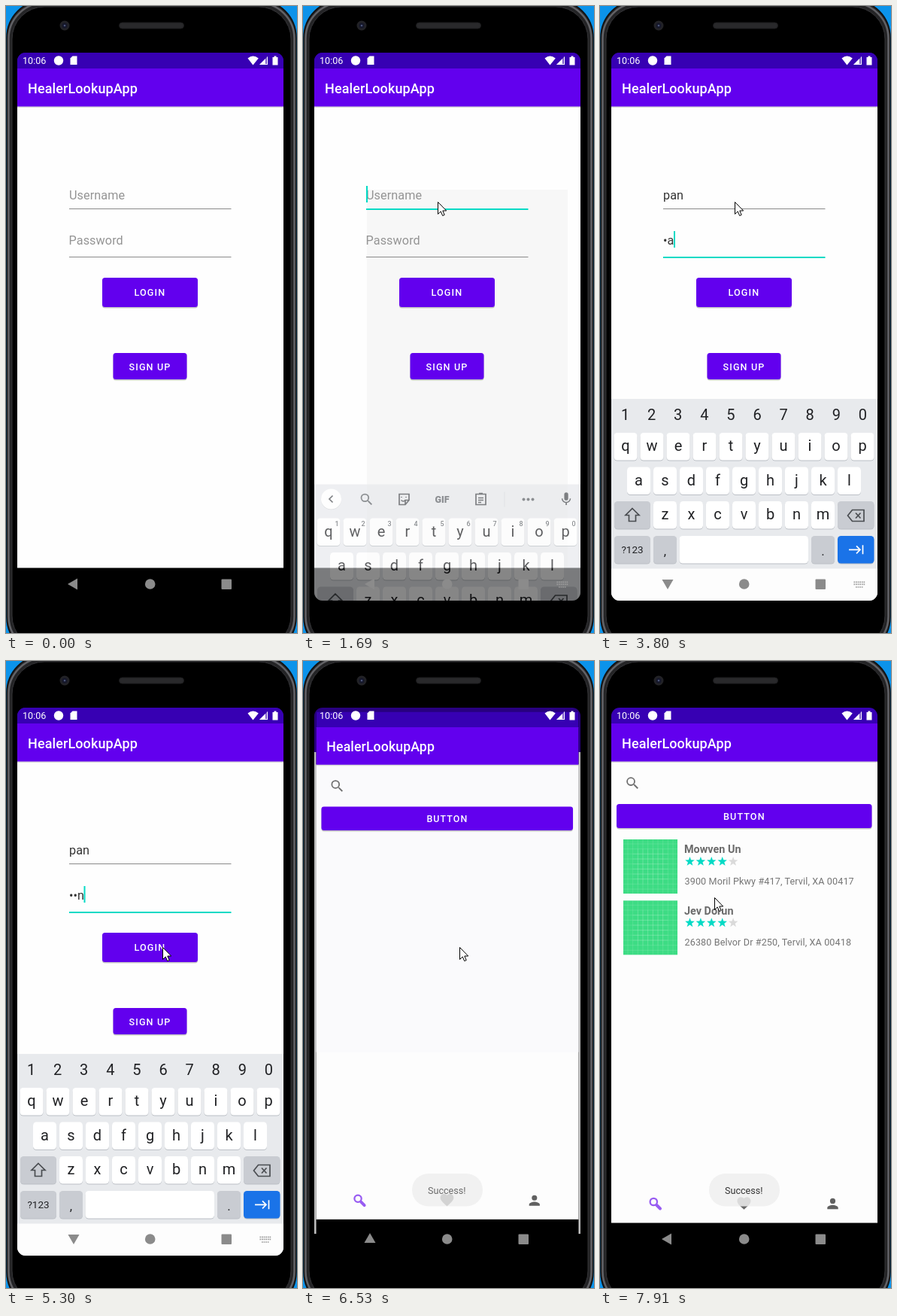
Animation, 387 px wide and 833 px high, one loop 8000 ms. Source, as an HTML page:

```html
<!DOCTYPE html>
<html lang="en">
<head>
<meta charset="utf-8">
<title>Login demo</title>
<style>
  html, body { margin: 0; width: 100%; height: 100%; overflow: hidden; background: #0c93ea; }
  svg { display: block; width: 387px; height: 833px; font: 16.2px Roboto, sans-serif; }
  .field { letter-spacing: .1px; fill: #333; }
  .hint { fill: #949494; }
  .btn { font-size: 12.6px; font-weight: 500; letter-spacing: 1.12px; fill: #fff; }
  .small { font-size: 12.6px; }
  .key { font-size: 20px; fill: #202124; text-anchor: middle; }
  .tip { font-size: 9px; font-weight: 500; fill: #5f6368; text-anchor: middle; }
  .word { font-size: 16.5px; fill: #3c4043; text-anchor: middle; }
  .line { fill: none; stroke: #4a4d51; stroke-width: 1.7; }
  .name { font-size: 14.4px; font-weight: 700; fill: #6b6b6b; }
  .addr { font-size: 12.6px; letter-spacing: .12px; fill: #757575; }
</style>
</head>
<body>
<svg viewBox="0 0 387 833">
  <defs>
    <clipPath id="screen"><rect x="15" y="62" width="354" height="728" rx="11"/></clipPath>
    <path id="search" d="M15.5 14h-.79l-.28-.27A6.47 6.47 0 0 0 16 9.5 6.5 6.5 0 1 0 9.5 16c1.61 0 3.09-.59 4.23-1.57l.27.28v.79l5 4.99L20.49 19zm-6 0A4.5 4.5 0 1 1 14 9.5 4.5 4.5 0 0 1 9.5 14z"/>
    <path id="mic" d="M12 14a3 3 0 0 0 3-3V5a3 3 0 0 0-6 0v6a3 3 0 0 0 3 3zm5.3-3c0 3-2.54 5.1-5.3 5.1S6.7 14 6.7 11H5c0 3.41 2.72 6.23 6 6.72V21h2v-3.28c3.28-.48 6-3.3 6-6.72z"/>
    <g id="bar">
      <rect x="15" y="133" width="354" height="2" opacity=".14"/>
      <rect x="15" y="62" width="354" height="22" fill="#3700b3"/>
      <rect x="15" y="83" width="354" height="50.500" fill="#6200ee"/>
      <text x="29" y="116" font-size="18" font-weight="500" letter-spacing=".1" fill="#fff">HealerLookupApp</text>
    </g>
  </defs>

  <!-- phone body -->
  <rect x="1" y="-8" width="385" height="870" rx="50" fill="#242426" stroke="#111" stroke-width="1.500"/>
  <rect x="3.500" y="-4" width="380" height="862" rx="47" fill="none" stroke="#626266" stroke-width="2.500"/>
  <rect x="8" y="1" width="371" height="852" rx="43" stroke="#343437"/>
  <rect x="150.500" y="22" width="86" height="8" rx="4" fill="#29292b" stroke="#1b1b1c"/>
  <circle cx="78" cy="26" r="6.500" fill="#222226"/>
  <circle cx="78" cy="26" r="3.500" fill="#15172a"/>
  <circle cx="78" cy="26" r="1.300" fill="#4b5478"/>

  <g clip-path="url(#screen)">
    <g data-t="0 6530">
      <rect x="15" y="133" width="354" height="613.500" fill="#fefefe"/>
      <rect data-t="1440 1810" x="85" y="244" width="267" height="502" fill="#f7f7f7"/>
      <rect data-t="6410 6530" x="15" y="133" width="354" height="613.500" fill="#fafafc"/>
      <use href="#bar"/>
      <text id="userHint" class="field hint" x="84" y="256.500">Username</text>
      <text id="passHint" class="field hint" x="83.500" y="317">Password</text>
      <text id="user" class="field" x="84" y="256.500"></text>
      <text id="pass" class="field" x="84" y="317"></text>
      <rect id="typed" x="84" y="257.500" height="1" fill="#444"/>
      <path id="userLine" d="M84 269.500H299.500"/>
      <path id="passLine" d="M84 333.500H299.500"/>
      <rect id="caret" width="2" height="22" fill="#03dac5"/>

      <rect data-t="5610 5880" x="127" y="363" width="129" height="41" rx="4" opacity=".2"/>
      <rect x="128" y="362" width="127" height="39.500" rx="3.500" opacity=".22"/>
      <rect x="128" y="361" width="127" height="39" rx="3.500" fill="#6200ee"/>
      <rect data-t="5610 5730" x="128" y="361" width="127" height="39" rx="3.500" fill="#fff" opacity=".1"/>
      <rect data-t="5730 5880" x="128" y="361" width="127" height="39" rx="3.500" fill="#fff" opacity=".2"/>
      <text class="btn" x="170.500" y="385.300">LOGIN</text>
      <rect x="142.500" y="462" width="98" height="35.500" rx="3.500" opacity=".22"/>
      <rect x="142.500" y="461" width="98" height="35" rx="3.500" fill="#6200ee"/>
      <text class="btn" x="163.500" y="483.500">SIGN UP</text>

      <g id="kb">
        <rect x="15" y="522" width="354" height="268" fill="#e8eaed"/>
        <rect x="15" y="747.500" width="354" height="43" fill="#fdfdfd"/>
        <g id="keys"></g>

        <path class="line" d="M43 667.500l9 9h-4.500v8h-9v-8H34z"/>
        <path class="line" d="M335.500 669.500H351v15H335.500l-6-7.500zM340 673.500l6.500 7m0-7l-6.500 7"/>
        <path class="line" d="M331 722.300h15m-5-5l5 5-5 5m8.500-11v12" style="stroke:#fff"/>
        <text class="key" x="43" y="727" style="font-size:13.500px">?123</text>
        <text class="key" x="86.500" y="730" style="font-size:17px">,</text>
        <text class="key" x="296.500" y="730" style="font-size:17px">.</text>

        <g data-t="0 3280">
          <circle cx="37.500" cy="542.300" r="13.500" opacity=".1"/>
          <circle cx="37.500" cy="541.500" r="13.500" fill="#fff"/>
          <use href="#mic" transform="translate(339.500 531) scale(.88)" fill="#4a4d51"/>
          <g class="line"><circle cx="121.500" cy="722" r="8.500"/><path d="M117 724q4.500 5 9 0"/></g>
          <g fill="#4a4d51"><circle cx="118.500" cy="719.500" r="1.400"/><circle cx="124.500" cy="719.500" r="1.400"/></g>
        </g>
        <g data-t="0 2080">
          <path class="line" d="M39.500 537l-4.500 4.500 4.500 4.500"/>
          <use href="#search" transform="translate(74 531.500) scale(.88)" fill="#5f6368"/>
          <path class="line" d="M128 535h13v8l-5 6h-8zM141 543h-5v6M130.500 543q3 3 5.500 0M131 538.500v1m6-1v1"/>
          <text x="185" y="546" text-anchor="middle" font-size="12.500" font-weight="900" fill="#5f6368">GIF</text>
          <path class="line" d="M230 535h13v14h-13zM233 540h7m-7 3h7m-7 3h4M234 534h5"/>
          <path d="M268 532v20" stroke="#d5d8dc"/>
          <g fill="#5f6368"><circle cx="293.500" cy="542" r="2"/><circle cx="299.500" cy="542" r="2"/><circle cx="305.500" cy="542" r="2"/></g>
        </g>
        <g data-t="2080 3280">
          <path class="line" d="M35.500 537l4.500 4.500-4.500 4.500"/>
          <path d="M139.500 531v21M242.500 531v21" stroke="#cfd2d6"/>
          <text class="word" x="94" y="548"></text>
          <text class="word" x="190.500" y="548"></text>
          <text class="word" x="287.500" y="548"></text>
        </g>
        <g data-t="3280 8000" id="digits"></g>
      </g>
      <rect id="shade" x="15" y="746.500" width="354" height="44"/>
    </g>

    <g data-t="6530 8000">
      <rect data-t="6530 6830" x="15" y="62" width="354" height="59" fill="#28007f"/>
      <rect data-t="6530 6830" x="15" y="121" width="354" height="640" fill="#bdbdbd"/>
      <g id="home">
        <rect x="15" y="62" width="354" height="728"/>
        <rect x="15" y="133" width="354" height="613.500" fill="#fdfdfd"/>
        <rect data-t="6530 6680" x="15" y="133" width="354" height="388" fill="#fafafc"/>
        <use href="#bar"/>
        <use href="#search" transform="translate(32.500 151.500) scale(.9)" fill="#707070"/>
        <rect x="22" y="191" width="339.500" height="32.500" rx="3.500" opacity=".22"/>
        <rect x="22" y="190" width="339.500" height="32" rx="3.500" fill="#6200ee"/>
        <text class="btn" x="164" y="211">BUTTON</text>
        <g data-t="6830 8000" id="list"></g>
        <g fill="none" stroke="#985cf2">
          <circle cx="71.300" cy="718.500" r="4.700" stroke-width="2.300"/>
          <path d="M75.500 723l4.500 4.500" stroke-width="4" stroke-linecap="round"/>
        </g>
        <path transform="translate(180.700 709.500) scale(.9)" fill="#666" d="M12 21.350l-1.450-1.320C5.400 15.360 2 12.280 2 8.500 2 5.420 4.420 3 7.500 3c1.740 0 3.410.81 4.500 2.090C13.090 3.810 14.760 3 16.500 3 19.580 3 22 5.420 22 8.500c0 3.780-3.400 6.860-8.550 11.540z"/>
        <path transform="translate(298.700 710.200) scale(.9)" fill="#616161" d="M12 12a4 4 0 1 0 0-8 4 4 0 0 0 0 8zm0 2c-2.670 0-8 1.340-8 4v2h16v-2c0-2.660-5.330-4-8-4z"/>
      </g>
    </g>

    <!-- status bar -->
    <rect data-t="0 6530" x="15" y="62" width="354" height="21" fill="#3700b3"/>
    <g fill="#fff">
      <text class="small" x="22" y="77.300">10:06</text>
      <circle cx="70" cy="72.500" r="6.200"/>
      <path d="M88.500 66.500H94.500V78H85.500V69.500z"/>
      <path d="M328.500 78.500L321.500 69.500Q328.500 63.500 335.800 69.500z"/>
      <path d="M348 67V78H337z" opacity=".35"/>
      <path d="M345 70V78H337zM347 67.500h1V78h-1zM338 77h10v1h-10z"/>
      <path d="M356.500 66.500h3V68h2v10.500h-7V68h2z"/>
    </g>

    <!-- navigation -->
    <g fill="#8b8b8b">
      <path id="back" d="M82 768l13-7.500v15z"/>
      <circle cx="191.700" cy="768" r="6.800"/>
      <rect x="286.500" y="761.500" width="13.500" height="13.500" rx="1"/>
      <path data-t="1440 6530" d="M337.500 765.300h15M337.500 768.300h15M340 772h10" stroke="#9c9c9c" stroke-width="1.700" stroke-dasharray="1.700 .9"/>
    </g>

    <g data-t="6410 8000">
      <rect id="toast" x="145" y="681" width="94" height="43.500" rx="21.500" fill="#efefef"/>
      <text id="toastText" class="small" x="166" y="707.500" fill="#333">Success!</text>
    </g>
  </g>

  <path id="pointer" d="M.5.5v16l3.700-3.600 2.500 5.700 2.500-1.100-2.400-5.500h4.900z" fill="#fff" stroke="#000"/>
</svg>

<script>
const LOOP = 8000;
const $ = id => document.getElementById(id);

const keyBox = (x, y, w, fill) =>
  `<rect x="${x}" y="${y + 1}" width="${w}" height="36.500" rx="4.500" fill="#bcc0c6"/>
   <rect x="${x}" y="${y}" width="${w}" height="36.500" rx="4.500" fill="${fill}"/>`;
const letters = (row, x0, y) => [...row].map((c, i) => {
  const x = x0 + i * 35;
  return keyBox(x - 15.5, y, 31, '#fff') + `<text class="key" x="${x}" y="${y + 24}">${c}</text>`;
}).join('');
const gray = '#c9ccd2';

$('keys').innerHTML =
  letters('qwertyuiop', 34, 567) + letters('asdfghjkl', 51.5, 612.5) + letters('zxcvbnm', 86.5, 658) +
  keyBox(19, 658, 48, gray) + keyBox(316, 658, 48.5, gray) +
  keyBox(19, 704, 48, gray) + keyBox(71, 704, 31, gray) +
  `<g data-t="0 3280">${keyBox(106, 704, 31, '#fff') + keyBox(140.5, 704, 136.5, '#fff') +
    [...'1234567890'].map((n, i) => `<text class="tip" x="${45 + i * 35}" y="577">${n}</text>`).join('')}</g>` +
  `<g data-t="3280 8000">${keyBox(105.5, 704, 171.500, '#fff')}</g>` +
  keyBox(281, 704, 31, gray) + keyBox(316, 704, 48.5, '#1a73e8');

$('digits').innerHTML = [...'1234567890']
  .map((n, i) => `<text class="key" x="${33.5 + i * 35.1}" y="549.500">${n}</text>`).join('');

const star = (cx, cy, fill) => {
  const pts = Array.from({ length: 10 }, (_, i) => {
    const r = i % 2 ? 2.7 : 6.6, a = (i / 5 - .5) * Math.PI;
    return `${cx + r * Math.cos(a)},${cy + r * Math.sin(a)}`;
  });
  return `<polygon points="${pts.join(' ')}" fill="${fill}"/>`;
};

// 108-unit tile: full lines every 10 units, doubled in the middle
const tile = (x, y) => {
  let d = '';
  for (let p = 9; p < 108; p += 10) d += `M${p} 0V108M0 ${p}H108`;
  let inner = '';
  for (let p = 29; p < 80; p += 10) inner += `M${p} 19V89M19 ${p}H89`;
  return `<g transform="translate(${x} ${y}) scale(.667)"><rect width="108" height="108" fill="#3ddc84"/>
    <g stroke="#fff" stroke-opacity=".2" stroke-width=".9"><path d="${d}"/><path d="${inner}"/></g></g>`;
};

$('list').innerHTML = [
  ['Mowven Un', '3900 Moril Pkwy #417, Tervil, XA 00417'],
  ['Jev Dorun', '26380 Belvor Dr #250, Tervil, XA 00418']
].map(([name, addr], i) => {
  const y = 237 + i * 81.3;
  const stars = [0, 1, 2, 3, 4].map(n => star(119.5 + n * 14.4, y + 29.5, n < 4 ? '#03dac5' : '#dadada'));
  return tile(31, y) + `<text class="name" x="112" y="${y + 18.2}">${name}</text>` + stars.join('') +
    `<text class="addr" x="112.500" y="${y + 59.5}">${addr}</text>`;
}).join('');

// Tracks: [start time, ...values], each held until the next entry
const tracks = {
  pointer: [[0, -50, -50], [680, 291, 242], [820, 235, 251], [940, 179, 260], [4850, 200, 331], [5000, 205, 359],
    [5150, 207, 376], [5300, 208, 380], [7640, 204, 376], [7790, 180, 348], [7910, 152, 314]],
  user: [[0, ''], [1930, 'p'], [2380, 'pa'], [2920, 'pan']],
  pass: [[0, ''], [3650, 'p'], [3800, '•a'], [4170, '••n'], [5610, '•••']],
  caret: [[0, -9, 0], [1320, 84, 239], [1930, 92.5, 239], [2380, 102, 239], [2920, 111, 239], [3160, 84, 299],
    [3650, 92.5, 299], [3800, 98, 299], [4170, 103.5, 299], [4700, -9, 0], [5150, 103.5, 299],
    [5610, 100, 299], [6160, -9, 0], [6410, 100, 299]],
  typed: [[0, 0], [2080, 9], [2530, 18], [3040, 27], [3160, 0]],
  words: [[0, 'p', 'pm', 'paper'], [2530, 'pa', 'pan', 'pancake']],
  focus: [[0, ''], [1320, 'user'], [3160, 'pass']],
  kb: [[0, 300, 0, 0], [1690, 113.5, .7, .25], [1810, 28, .93, .08], [1930, 0, 1, 0]],
  back: [[0, 0], [1810, -90], [6530, 90], [6680, 0]],
  zoom: [[0, .9855], [6680, .997], [6830, 1]],
  toast: [[0, 0, .4], [6530, .8, .7], [6680, .86, 1]]
};
const at = (key, t) => tracks[key].filter(e => e[0] <= t).pop().slice(1);

const timed = [...document.querySelectorAll('[data-t]')].map(el => [el, ...el.dataset.t.split(' ').map(Number)]);
const wordEls = document.querySelectorAll('.word');
const set = (id, attrs) => { for (const k in attrs) $(id).setAttribute(k, attrs[k]); };

function draw(t) {
  for (const [el, from, to] of timed) el.style.display = t >= from && t < to ? '' : 'none';

  const [focus] = at('focus', t);
  for (const f of ['user', 'pass']) {
    const [text] = at(f, t);
    $(f).textContent = text;
    $(f + 'Hint').style.display = text ? 'none' : '';
    const on = focus === f;
    set(f + 'Line', { stroke: on ? '#03dac5' : '#8a8a8a', 'stroke-width': on ? 2 : 1, transform: `translate(0 ${on ? .5 : 0})` });
  }
  const [cx, cy] = at('caret', t);
  set('caret', { x: cx, y: cy });
  set('typed', { width: at('typed', t)[0] });
  at('words', t).forEach((w, i) => { wordEls[i].textContent = w; });

  const [dy, alpha, shade] = at('kb', t);
  set('kb', { transform: `translate(0 ${dy})`, opacity: alpha });
  set('shade', { opacity: shade });
  set('back', { transform: `rotate(${at('back', t)[0]} 89.500 767.500)` });

  const [z] = at('zoom', t);
  set('home', { transform: `translate(192 426) scale(${z}) translate(-192 -426)` });
  const [box, label] = at('toast', t);
  set('toast', { opacity: box });
  set('toastText', { opacity: label });
  set('pointer', { transform: `translate(${at('pointer', t).join(' ')})` });
}

const start = performance.now();
function tick() {
  draw((performance.now() - start) % LOOP);
  requestAnimationFrame(tick);
}
tick();
</script>
</body>
</html>
```
